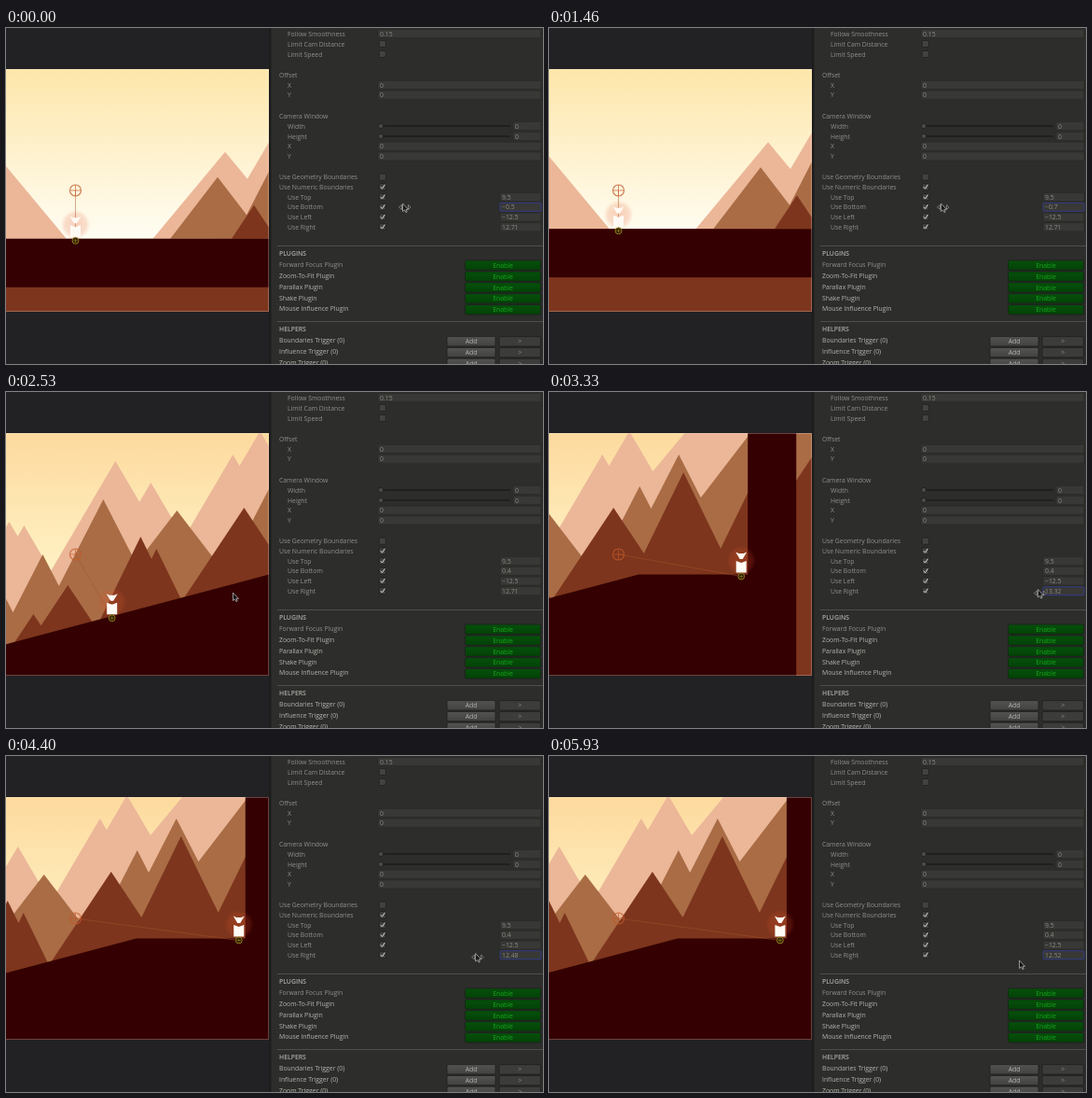
Animation of 576 by 360 pixels, one loop 6060 ms. Source, as an HTML page:

```html
<!DOCTYPE html>
<html lang="en">
<head>
<meta charset="utf-8">
<title>Camera boundaries</title>
<style>
html, body { margin: 0; width: 100%; height: 100%; overflow: hidden; background: #222225; }
svg { display: block; width: 576px; height: 360px; }
text { font: 6.85px "Open Sans", "Noto Sans", sans-serif; fill: #90908c; }
.value { fill: #8b8b87; }
.head { font-weight: 600; fill: #aaaaa6; }
.lit { fill: #b4b4b0; }
.mid { text-anchor: middle; }
.go { fill: #18a81e; }
.field { fill: #383836; stroke: #2a2a28; stroke-width: .7; }
.focus { stroke: #3440a8; }
</style>
</head>
<body>
<svg viewBox="0 0 576 360">
  <defs>
    <clipPath id="view"><rect y="44" width="282" height="260"/></clipPath>
    <linearGradient id="sky" gradientUnits="userSpaceOnUse" x1="0" y1="44" x2="0" y2="226">
      <stop offset="0"/><stop offset="1"/>
    </linearGradient>
    <radialGradient id="glow">
      <stop offset="0" stop-color="#e0562c" stop-opacity=".26"/>
      <stop offset=".7" stop-color="#e0562c" stop-opacity=".18"/>
      <stop offset="1" stop-color="#e0562c" stop-opacity="0"/>
    </radialGradient>
    <linearGradient id="green" x1="0" y1="0" x2="0" y2="1">
      <stop offset="0" stop-color="#06500b"/><stop offset="1" stop-color="#034207"/>
    </linearGradient>
    <linearGradient id="grey" x1="0" y1="0" x2="0" y2="1">
      <stop offset="0" stop-color="#535351"/><stop offset="1" stop-color="#424240"/>
    </linearGradient>
  </defs>
  <rect width="576" height="360" fill="#222225"/>
  <g clip-path="url(#view)">
    <rect y="44" width="282" height="260" fill="url(#sky)"/>
    <g id="world"></g>
    <line id="link" x1="74.5" y1="174" stroke="#a5552c" stroke-width=".9" opacity=".55"/>
    <g id="player">
      <circle cy="-15" r="16" fill="url(#glow)"/>
      <path d="M-6-24L-2.5-22.5H2.5L6-24L1.5-16.5H-1.5Z M-5.5-14.5L0-12.5L5.5-14.5V-2H-5.5Z" fill="#fffaf4"/>
      <g fill="none" stroke="#94801c">
        <circle cy="2" r="3.4" fill="#2c1a04"/><path d="M-2 2H2M0 0V4" stroke-width=".7"/>
      </g>
    </g>
    <g fill="none" stroke="#c2592a" opacity=".75">
      <circle cx="74.5" cy="174" r="6" stroke-width="1.2"/>
      <path d="M68.5 174H80.5M74.5 168V180" stroke-width=".9"/>
    </g>
  </g>
  <path d="M0 44.5H281.5V303.5H0" fill="none" stroke="#ffe6d6" stroke-opacity=".28"/>
  <rect x="282" width="2.5" height="360" fill="#1d1d1d"/>
  <rect x="284.5" width="291.5" height="360" fill="#2d2d2b"/>
  <g id="panel"></g>
  <g id="cursor">
    <path id="arms" d="M-3.5-3.5L-6.5-1L-3.5 1.5Z M3.5-3.5L6-1L3.5 1.5Z" fill="#2a2a2a" stroke="#8e8e8c" stroke-width=".8"/>
    <path d="M-2.5-5V3.5L-.4 1.9L.9 4.6L2.2 4L1 1.4H3.5Z" fill="#151515" stroke="#b4b4b4" stroke-width=".8"/>
  </g>
</svg>
<script>
const LOOP = 6060, STEP = 200 / 3, UNIT = 52.4, BASE = 273;
const $ = id => document.getElementById(id);
const set = (id, attrs) => { for (const k in attrs) $(id).setAttribute(k, attrs[k]); };
const mix = (a, b, f) => a + (b - a) * f;
const span = (t, a, b) => Math.min(1, Math.max(0, (t - a) / (b - a)));

// Each range is a row of symmetric peaks that share one slope.
const range = (color, slope, ...peaks) => peaks.map(([x, y]) => {
  const w = (BASE - y) / slope;
  return `<path fill="${color}" d="M${x - w} ${BASE}L${x} ${y}L${x + w} ${BASE}Z"/>`;
}).join('');
const PINK = '#ebb798', TAN = '#a96c45', RUST = '#7d351d';
const RISE = 286, CREST = 579, LEDGE = 195.5, WALL = 696, THICK = 52;

$('world').innerHTML =
  range(PINK, 1.2, [-36, 152], [235, 180], [665, 0]) +
  range(PINK, 1.7, [300, 139], [316, 143], [414, 74], [452, 97], [540, 67], [569, 42]) +
  range(TAN, 1.3, [227, 207], [480, 127], [745, -16]) +
  range(TAN, 1.95, [284, 197], [336, 174], [401, 115], [580, 101], [622, 67]) +
  range(RUST, 1.5, [266, 237], [326, 238], [363, 207], [552, 124], [810, 2]) +
  range(RUST, 2.05, [441, 155], [458, 168], [627, 86], [700, 100]) +
  `<rect x="-400" y="${BASE}" width="1400" height="300" fill="${RUST}"/>
   <path fill="#340002" d="M-400 ${BASE}H${RISE}L${CREST} ${LEDGE}H${WALL}V-300h${THICK}V${BASE + THICK}H-400Z"/>`;

// Inspector panel
const parts = [];
const text = (x, y, s, cls = '', id = '') =>
  parts.push(`<text x="${x}" y="${y + 2.5}" class="${cls}" id="${id}">${s}</text>`);
const field = (x, y, s, id = '') => {
  parts.push(`<rect class="field" id="${id && id + 'Box'}" x="${x}" y="${y - 4.5}" width="${574 - x}" height="9" rx="1"/>`);
  text(x + 2, y, s, 'value', id);
};
const check = (y, on) => {
  parts.push(`<rect x="400.3" y="${y - 3.5}" width="7" height="7" rx="1" fill="#424240" stroke="#20201e" stroke-width=".8"/>`);
  if (on) parts.push(`<path d="M401.8 ${y - .2}l1.7 2 2.9-4.4" fill="none" stroke="#d8d8d4"/>`);
};
const slider = y => {
  parts.push(`<path d="M400 ${y}H541" stroke="#1c1c1a" stroke-width="1.4"/>
    <circle cx="402" cy="${y}" r="2.6" fill="#4b4b49" stroke="#191917" stroke-width=".7"/>`);
  field(544, y, '0');
};
const button = (x, y, w, s, fill, cls) => {
  parts.push(`<rect x="${x}" y="${y - 5.2}" width="${w}" height="10.4" rx="1.5" fill="${fill}" stroke="#1a1c1a" stroke-width=".7"/>`);
  text(x + w / 2, y, s, 'mid ' + cls);
};
const section = (y, s) => {
  parts.push(`<path d="M291 ${y}H576" stroke="#4e4e4c"/>`);
  text(293, y + 7.8, s, 'head');
};

text(302, 6, 'Follow Smoothness'); field(399, 6, '0.15');
text(302, 17, 'Limit Cam Distance'); check(17);
text(302, 28, 'Limit Speed'); check(28);
text(293, 50, 'Offset');
text(293, 94, 'Camera Window');
text(302, 105, 'Width'); slider(105);
text(302, 116, 'Height'); slider(116);
for (const top of [61, 126.8]) ['X', 'Y'].forEach((s, i) => {
  const y = top + i * 10.7;
  text(302, y, s); field(399, y, '0');
});
text(293, 159.7, 'Use Geometry Boundaries'); check(159.7);
text(293, 170.4, 'Use Numeric Boundaries'); check(170.4, true);
[['Top', '9.5'], ['Bottom', '', 'bottom'], ['Left', '−12.5'], ['Right', '', 'right']].forEach(([s, v, id], i) => {
  const y = 181.2 + i * 10.67;
  text(302, y, 'Use ' + s); check(y, true); field(530, y, v, id);
});
section(233.5, 'PLUGINS');
['Forward Focus', 'Zoom-To-Fit', 'Parallax', 'Shake', 'Mouse Influence'].forEach((s, i) => {
  const y = 253.3 + i * 11.9;
  text(293, y, s + ' Plugin', i ? 'lit' : '');
  button(492.5, y + .9, 81, 'Enable', 'url(#green)', 'go');
});
section(314.5, 'HELPERS');
['Boundaries', 'Influence', 'Zoom'].forEach((s, i) => {
  const y = 334.8 + i * 11.8;
  text(293, y, s + ' Trigger (0)', 'lit');
  button(473, y + 1, 52, 'Add', 'url(#grey)', 'lit');
  button(529, y + 1, 44.5, '&gt;', '#3c3c3a', '');
});
$('panel').innerHTML = parts.join('');

// A dragged number: start value, then moves of [from, until, value].
const drag = (start, ...moves) => t =>
  moves.reduce((v, [a, b, to]) => mix(v, to, span(t, a, b)), start);
const bottomAt = drag(-.5, [133, 400, -1.35], [600, 867, -2], [867, 1467, -.7], [1467, 1667, .4]);
const rightAt = drag(12.71, [3000, 3600, 13.8], [3733, 4200, 12.34], [4333, 5000, 13.78], [5133, 5867, 12.52]);

const START = 1968, SPEED = .594, LAG = 66;
const groundY = x => mix(BASE, LEDGE, span(x, RISE, CREST));
const daySky = [[253, 230, 170], [255, 253, 243]];
const duskSky = [[253, 218, 158], [255, 247, 205]];
const stops = document.querySelectorAll('#sky stop');
const show = (v, digits) => String(Number(v.toFixed(digits))).replace('-', '−');

function draw(now) {
  const ms = now % LOOP;
  const t = ms < 200 ? 0 : 200 + Math.floor((ms - 192) / STEP) * STEP;
  const bottom = bottomAt(t), right = rightAt(t);

  // The camera trails the runner exponentially until the right limit stops it.
  const run = Math.max(0, t - START);
  const x = Math.min(WALL - 7.5, 74 + run * SPEED);
  const follow = SPEED * (run - LAG * (1 - Math.exp(-run / LAG)));
  const cam = Math.min(follow, WALL - 257 + (right - 12.48) * UNIT);
  const dy = (bottom - .4) * UNIT;
  const px = x - cam + .5, py = groundY(x) + dy;

  set('world', { transform: `translate(${-cam} ${dy})` });
  set('player', { transform: `translate(${px} ${py})` });
  set('link', { x2: px, y2: py + 2 });
  const dusk = span(cam, 0, 290);
  stops.forEach((s, i) => s.setAttribute('stop-color',
    `rgb(${daySky[i].map((c, j) => Math.round(mix(c, duskSky[i][j], dusk)))})`));

  $('bottom').textContent = show(bottom, 1);
  $('right').textContent = show(right, 2);
  $('bottomBox').classList.toggle('focus', t < 1750);
  $('rightBox').classList.toggle('focus', t > 2980);

  // The pointer follows the dragged number, with a trip to the game view between.
  const early = t < 2300, released = t > 5850;
  const away = span(t, 1667, 1933) - span(t, 2600, 3000);
  const homeX = early ? 428 + (bottom + .5) * 25 : 506 + (right - 12.48) * 25;
  const homeY = early ? 193 : released ? 224 : 216.5;
  set('cursor', { transform: `translate(${mix(homeX, 246, away)} ${mix(homeY, 220, away)})` });
  const plain = away > 0 || released;
  set('arms', { visibility: plain ? 'hidden' : 'visible' });
}

function tick() {
  draw(performance.now());
  requestAnimationFrame(tick);
}
tick();
</script>
</body>
</html>
```
